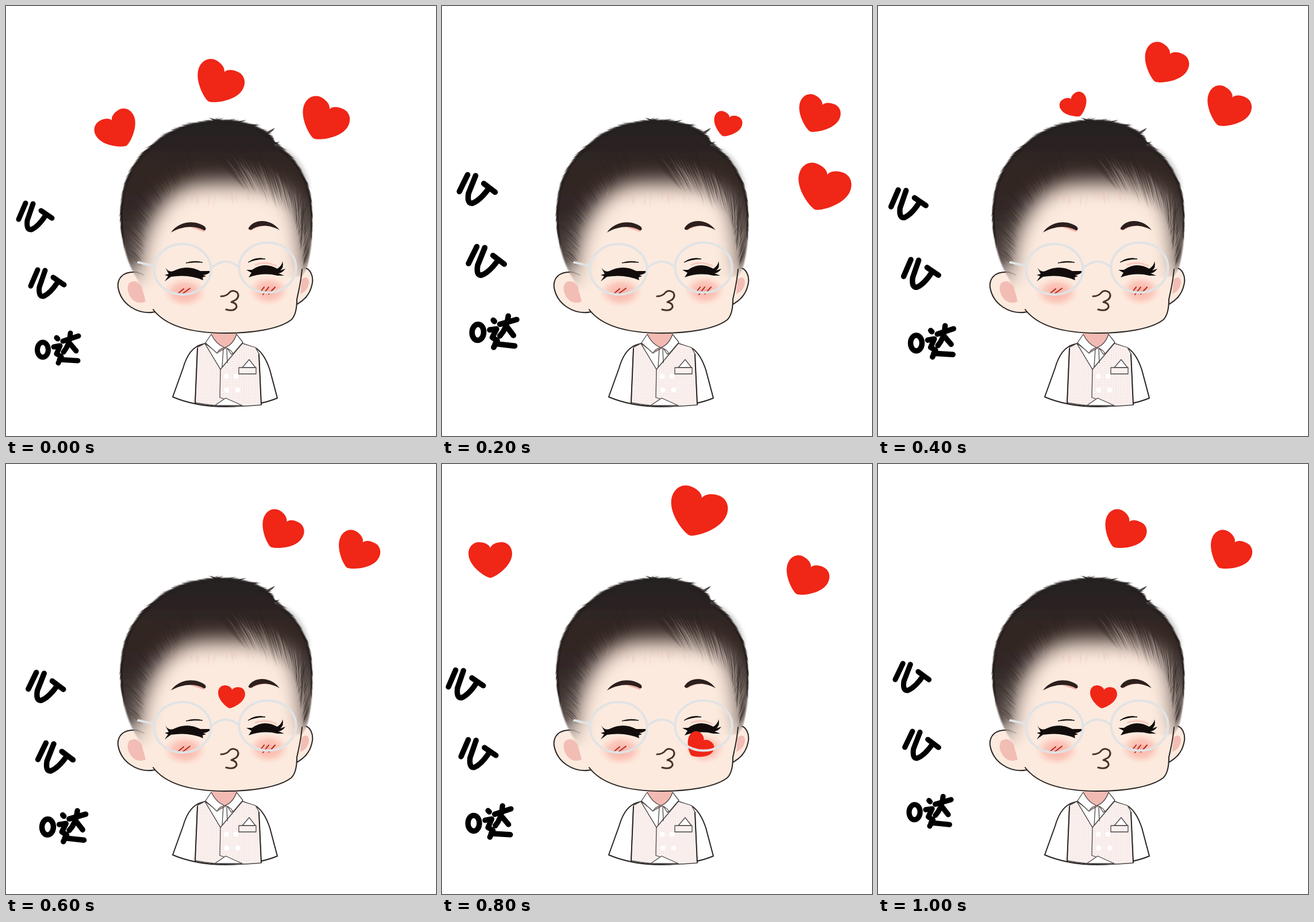
An HTML page for the animation above (1.2 s loop, 748 px wide and 748 px high).

```html
<!DOCTYPE html>
<html lang="zh">
<head>
<meta charset="utf-8">
<title>Kiss</title>
<style>
  html, body { margin: 0; width: 100%; height: 100%; overflow: hidden; background: #fff; }
  svg { display: block; width: 100%; height: 100%; }
  .line { fill: none; stroke: #2a2524; stroke-width: 2; stroke-linecap: round; stroke-linejoin: round; }
  .cloth { stroke: #4a4646; stroke-width: 1.3; stroke-linejoin: round; }
  #words { fill: none; stroke: #000; stroke-width: 9; stroke-linecap: round; stroke-linejoin: round; }
</style>
</head>
<body>
<svg viewBox="0 0 748 748">
  <defs>
    <path id="heart" d="M0 31C-7 31-38 11-38-11C-38-24-29-31-20-31C-10-31-2-27 0-21C2-27 10-31 20-31C29-31 38-24 38-11C38 11 7 31 0 31Z"/>
    <path id="heartWord" d="M34 343L22 371M47 344L37 373Q35 390 44 389Q56 384 69 364M61 356L80 369"/>
    <path id="outer" d="M243 498L226 470C206 440 196 385 200 345C204 300 222 268 252 243C282 215 320 200 372 198C410 198 445 207 465 230L468 241C498 255 521 290 530 330C535 375 533 420 523 455L514 470"/>
    <path id="inner" d="M238 485C230 440 236 390 256 350C275 315 310 292 345 290C395 292 440 322 478 338C505 352 517 400 517 465"/>
    <path id="face" d="M241 470L258 530C280 562 330 569 382 569C430 569 475 562 496 546Q506 537 506 512L516 450V300H240Z"/>
    <clipPath id="head"><use href="#outer"/><use href="#face"/></clipPath>
    <linearGradient id="dark" gradientUnits="userSpaceOnUse" x1="0" y1="196" x2="0" y2="498">
      <stop offset="0" stop-color="#242020"/><stop offset=".25" stop-color="#302624"/>
      <stop offset=".5" stop-color="#302725"/><stop offset=".82" stop-color="#463b38"/>
      <stop offset="1" stop-color="#5a4d49" stop-opacity="0"/>
    </linearGradient>
    <radialGradient id="blush">
      <stop offset="0" stop-color="#faaea2"/><stop offset=".55" stop-color="#fbc2b6" stop-opacity=".85"/>
      <stop offset="1" stop-color="#fdd5c8" stop-opacity="0"/>
    </radialGradient>
    <pattern id="dots" width="4" height="4" patternUnits="userSpaceOnUse">
      <path d="M0 0H4V4H0Z" fill="#faf1ef"/><circle cx="2" cy="2" r=".8" fill="#efd9d6"/>
    </pattern>
    <filter id="soft" x="-30%" y="-30%" width="160%" height="160%"><feGaussianBlur stdDeviation="18"/></filter>
    <filter id="haze" x="-50%" y="-50%" width="200%" height="200%"><feGaussianBlur stdDeviation="3"/></filter>
    <filter id="edge"><feGaussianBlur stdDeviation="1.3"/></filter>
  </defs>

  <!-- body -->
  <path d="M357 565H401V592L380 606L360 592Z" fill="#f2bab2"/>
  <path class="line" style="fill:#fff" d="M347 587Q335 590 331 593Q316 602 308 630L290 680Q330 697 382 697Q440 696 472 682L459 633Q450 606 436 596L411 587L384 640Z"/>
  <path class="cloth" fill="url(#dots)" stroke-width="1" d="M346 587L333 594L329 690Q380 700 444 694L440 605L434 594L411 587L373 632Z"/>
  <path class="line" d="M333 596L329 690M440 606L444 693"/>
  <path class="cloth" fill="#fff" d="M346 587L373 632L411 587L392 606L384 594L368 603Z"/>
  <path class="cloth" fill="#fff" d="M357 571L347 586L367 604Q370 597 380 594Q366 589 357 571ZM401 571L412 585L395 605Q391 597 381 594Q395 589 401 571Z"/>
  <path class="cloth" fill="none" d="M378 596L376 628M384 596L385 621M373 632L372 681L381 684"/>
  <path class="cloth" fill="#fff" d="M363 695L382 682L411 695Z"/>
  <path class="cloth" fill="#fff" d="M411 629L423 615L434 629Z"/>
  <path class="cloth" fill="#faf1ef" d="M405 629H435V640H405Z"/>
  <g fill="#fff"><circle cx="383" cy="644" r="4.5"/><circle cx="400" cy="644" r="4.5"/><circle cx="384" cy="668" r="4.5"/><circle cx="403" cy="668" r="4.5"/></g>

  <!-- ears and face -->
  <g class="line" style="fill:#fdeade">
    <path d="M228 463C203 461 193 474 195 490C200 518 228 538 260 532L270 480Z"/>
    <path d="M513 456C530 452 536 472 532 486C528 503 518 512 506 519L500 470Z"/>
  </g>
  <path d="M214 482Q226 473 236 488L243 514Q228 521 217 507Q208 493 214 482ZM514 476Q525 467 527 480Q526 495 512 501Z" fill="#f2bdb4"/>
  <use href="#face" fill="#fdeade"/>

  <!-- hair -->
  <path d="M480 245Q522 265 529 320L500 290Z" fill="#bbb" opacity=".6" filter="url(#haze)"/>
  <use href="#outer" fill="url(#dark)" filter="url(#edge)"/>
  <g clip-path="url(#head)">
    <path filter="url(#soft)" fill="#fdeade" d="M226 620L230 460C236 400 252 362 282 333Q315 306 350 308Q410 306 448 311Q488 318 504 350Q518 400 519 470V620Z"/>
  </g>
  <g id="strands"></g>
  <path class="line" d="M256 528C280 560 330 569 382 569C430 569 475 562 496 546Q506 537 506 510Q513 480 515 458"/>

  <!-- features -->
  <ellipse cx="311" cy="498" rx="39" ry="27" fill="url(#blush)"/>
  <ellipse cx="457" cy="495" rx="36" ry="27" fill="url(#blush)"/>
  <path d="M297 502L309 492M308 500L320 491M442 498L449 489M447 502L457 489M457 501L468 489" stroke="#b4271f" stroke-width="2" stroke-linecap="round"/>
  <path d="M321 383L344 391M426 389Q440 380 456 381" fill="none" stroke="#f5aea4" stroke-width="3" stroke-linecap="round"/>
  <path d="M434 450Q452 443 470 452" fill="none" stroke="#f9cabf" stroke-width="3" stroke-linecap="round"/>
  <g fill="#2c1f1d">
    <path d="M287 394C300 374 331 371 347 385Q349 391 344 390C328 381 306 383 287 394Z"/>
    <path d="M422 386C432 370 460 369 476 390C458 380 440 380 427 389Q421 390 422 386Z"/>
  </g>
  <g fill="#120d0c">
    <path d="M277 455Q283 464 291 461Q315 449 338 461L358 461Q350 468 343 468L348 470L342 472L343 477Q318 466 287 471L276 479L282 470L276 468L283 466Z"/>
    <path d="M418 459L428 459Q449 444 472 457Q480 452 481 444Q484 455 477 460L486 457Q480 465 474 465L484 469L472 469Q448 463 422 472L427 464Z"/>
    <path d="M313 447Q328 442 342 446Q328 445 313 447ZM421 446Q434 436 451 440Q434 440 421 446Z" stroke="#120d0c"/>
  </g>
  <path d="M374 505Q384 505 389 498Q394 493 402 498Q407 505 400 511L392 515Q402 517 401 524Q397 532 383 528" fill="none" stroke="#4b302a" stroke-width="3" stroke-linecap="round" stroke-linejoin="round"/>

  <g id="hearts" fill="#f02617"></g>

  <g fill="none" stroke="#e0e3e5" stroke-width="4" stroke-linecap="round">
    <ellipse cx="307" cy="458" rx="49.5" ry="44"/>
    <ellipse cx="455" cy="455" rx="49.5" ry="43.5"/>
    <path d="M357 456Q381 434 405 454M230 446L257 452"/>
  </g>

  <g id="words">
    <use href="#heartWord"/>
    <use href="#heartWord" x="21" y="116"/>
    <ellipse cx="64" cy="598" rx="9.5" ry="13"/>
    <path d="M88 577L90 579M83 593L94 591L88 605L96 610L91 621M93 615L125 617M99 583L126 574M112 569Q111 589 100 602M111 587L122 600"/>
  </g>
</svg>
<script>
const $ = id => document.getElementById(id);

let seed = 7;
const rand = (a, b) => {
  seed = seed * 16807 % 2147483647;
  return a + (b - a) * seed / 2147483647;
};
const mix = (p, q, k) => ({ x: p.x + (q.x - p.x) * k, y: p.y + (q.y - p.y) * k });
const along = path => {
  const len = path.getTotalLength();
  return t => path.getPointAtLength(Math.max(0, Math.min(1, t)) * len);
};
const outer = along($('outer')), inner = along($('inner'));

// A thin curved strand, pointed at both ends
function strand(a, b, width, bend, fill, opacity) {
  const dx = b.x - a.x, dy = b.y - a.y, len = Math.hypot(dx, dy) || 1;
  const ctrl = k => `${((a.x + b.x) / 2 - dy / len * k).toFixed(1)} ${((a.y + b.y) / 2 + dx / len * k).toFixed(1)}`;
  const at = p => `${p.x.toFixed(1)} ${p.y.toFixed(1)}`;
  return `<path d="M${at(a)}Q${ctrl(bend + width)} ${at(b)}Q${ctrl(bend - width)} ${at(a)}" fill="${fill}" opacity="${opacity}"/>`;
}

function hair() {
  let s = '';
  for (let n = 0; n < 330; n++) {
    const t = rand(.1, .93), slant = t > .45 && t < .78 ? .12 : (t - .42) * .12;
    const end = inner(t + slant), root = outer(t);
    s += strand(mix(root, end, rand(.15, .7)), mix(root, end, rand(.9, 1.2)),
      rand(.6, 1.6), rand(-5, 2), '#2d2422', rand(.1, .4).toFixed(2));
  }
  for (let n = 0; n < 70; n++) {
    const t = rand(.48, .8), end = inner(t + .12), root = outer(t);
    s += strand(mix(root, end, rand(.5, .8)), mix(root, end, rand(1, 1.15)), .8, -4, '#d8c5bc', .35);
  }
  for (let n = 0; n < 200; n++) {
    const t = rand(.1, .92), side = t < .52 ? 1 : -1;
    s += strand(mix(outer(t + side * .045), inner(t), .07), mix(inner(t), outer(t), rand(1, 1.06)),
      rand(1, 2.2), side * -2, '#262120', .7);
  }
  for (let n = 0; n < 34; n++) {
    const x = rand(285, 455), y = rand(315, 332);
    s += strand({ x, y }, { x: x + (x - 350) * .06, y: y + rand(12, 28) }, .8, 0, '#f0aca0', .45);
  }
  s += strand({ x: 448, y: 224 }, { x: 468, y: 212 }, 4, 2, '#262120', .8);
  s += strand({ x: 460, y: 240 }, { x: 476, y: 236 }, 3, 2, '#262120', .8);
  return s;
}
$('strands').innerHTML = hair();

// Words: x, y, scale, angle; each heart: x, y, scale, angle
const poses = [
  { words: [51, 366, 1, 0], hearts: [[368.7, 135.4, 1.12, 28], [551.7, 199.9, 1.12, 28], [194.4, 216.7, .98, -30]] },
  { words: [61.5, 319, 1.07, 3], hearts: [[495.5, 206.9, .66, 20], [653, 190.6, .98, 25], [661.8, 318, 1.235, 19]] },
  { words: [53, 344, 1.045, 0], hearts: [[497.6, 103.1, 1.05, 28], [606.6, 178.6, 1.05, 27], [342.3, 173.9, .64, -28]] },
  { words: [69.5, 387.5, 1.05, 2.5], hearts: [[477, 118, 1, 32], [609.6, 154, 1, 32], [391.5, 405.8, .62, 8]] },
  { words: [41.5, 382.5, 1.045, 0], hearts: [[84, 167, 1, 0], [443.5, 85.4, 1.32, 18], [631.7, 198.4, 1.02, 28], [446.4, 491.3, .65, 40]] },
  { words: [59.5, 371, 1.01, 2.2], hearts: [[426, 118, 1, 32], [609.6, 154, 1, 32], [391.5, 405.8, .62, 8]] }
];
const place = ([x, y, size, angle]) => `translate(${x} ${y}) rotate(${angle}) scale(${size})`;

let shown = -1;
function draw() {
  const step = Math.floor(performance.now() / 200) % poses.length;
  if (step !== shown) {
    shown = step;
    const { words, hearts } = poses[step];
    $('words').setAttribute('transform', place(words) + ' translate(-51 -366)');
    $('hearts').innerHTML = hearts.map(h => `<use href="#heart" transform="${place(h)}"/>`).join('');
  }
  requestAnimationFrame(draw);
}
draw();
</script>
</body>
</html>
```
